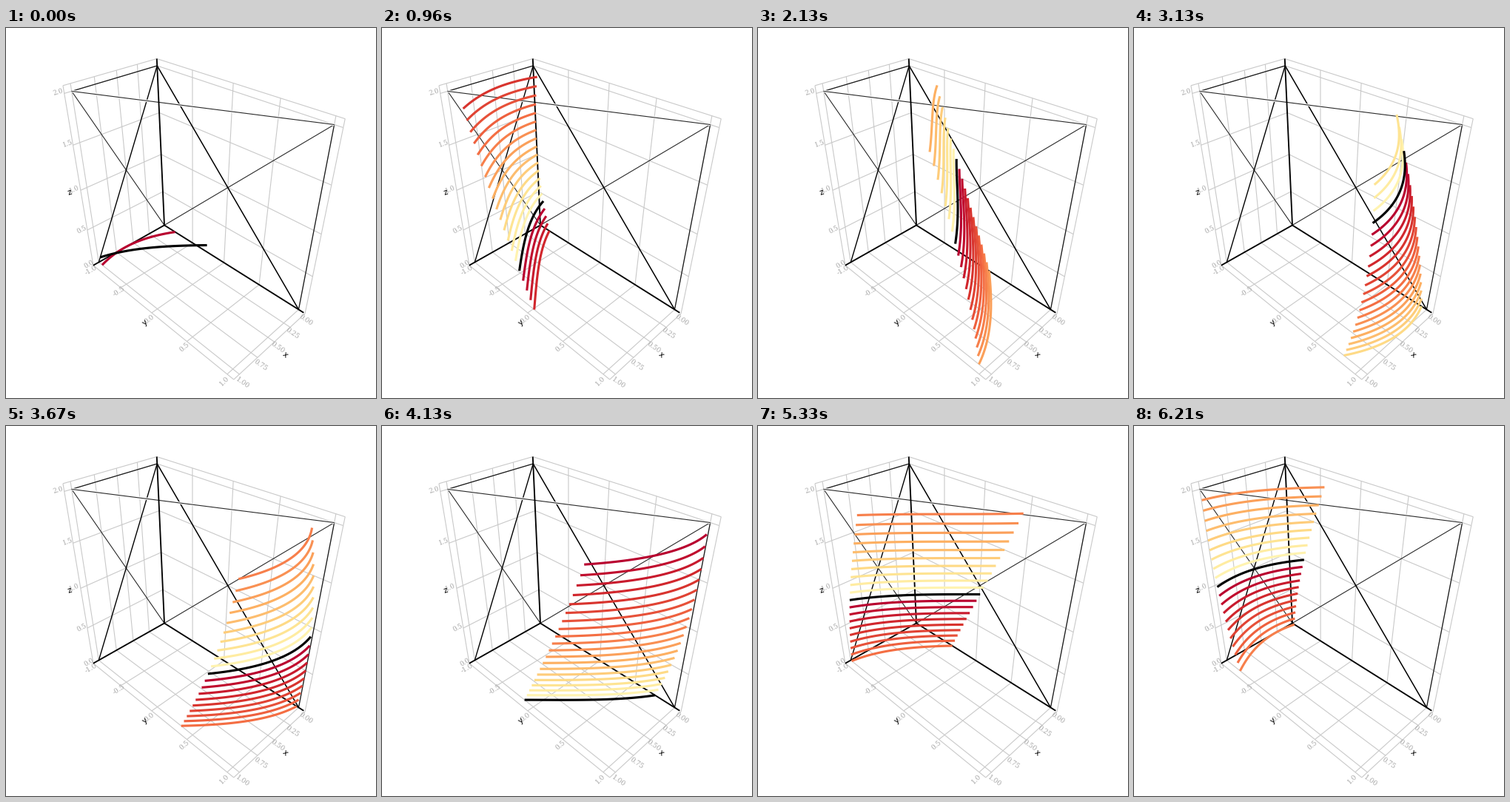
A matplotlib script that plays this animation: 500 by 500 pixels, repeating every 6.25 s.

```python
import numpy as np
import matplotlib.pyplot as plt
from matplotlib.animation import FuncAnimation
from matplotlib.colors import LinearSegmentedColormap

SIZE, STEPS, LOOP_MS = 500, 150, 6250
FRAMES = 2 * STEPS  # half steps, so each pose sits on its nearest tick
LEVELS, DZ = 20, 0.1
X_MAX, Y_MAX, Z_MAX = 1.075, 1.075, 2.07

# Box corners and where the camera puts them on the stage
CORNERS = np.array([[0, -1, 0], [1, -1, 0], [0, 1, 0], [0, -1, 2],
                    [1, -1, 2], [0, 1, 2], [X_MAX, Y_MAX, 0]])
PIXELS = np.array([[213.3, 266], [125, 316], [395, 380], [204, 50.5],
                   [88, 85], [443, 130], [307.3, 474.5]])


def solve_camera(points, pixels):
    """Perspective camera as a 3x4 matrix, by least squares."""
    rows, rhs = [], []
    for p, (px, py) in zip(points, pixels):
        h, none = [*p, 1], [0] * 4
        rows += [h + none + list(-px * p), none + h + list(-py * p)]
        rhs += [px, py]
    m = np.linalg.lstsq(np.array(rows, float), np.array(rhs), rcond=None)[0]
    return np.append(m, 1).reshape(3, 4)


CAMERA = solve_camera(CORNERS, PIXELS)


def project(x, y, z):
    x, y, z = np.broadcast_arrays(x, y, z)
    a, b, w = CAMERA @ np.array([x, y, z, np.ones_like(x, float)])
    return a / w, b / w


fig = plt.figure(figsize=(5, 5), dpi=100, facecolor="white")
ax = fig.add_axes([0, 0, 1, 1])
ax.set(xlim=(-0.5, SIZE - 0.5), ylim=(SIZE - 0.5, -0.5))
ax.axis("off")


def segment(p, q, color="black", lw=1.0, zorder=2):
    ax.plot(*project(*np.array([p, q], float).T), color=color, lw=lw,
            zorder=zorder, solid_capstyle="butt")


def grid(p, q):
    segment(p, q, "#c9c9c9", 0.8, 1)


for x in (0.25, 0.5, 0.75, 1, X_MAX):
    grid((x, -1, 0), (x, Y_MAX, 0))
    grid((x, -1, 0), (x, -1, Z_MAX))
for y in (-0.5, 0, 0.5, 1, Y_MAX):
    grid((0, y, 0), (X_MAX, y, 0))
    grid((0, y, 0), (0, y, Z_MAX))
for z in (0.5, 1, 1.5, 2, Z_MAX):
    grid((0, -1, z), (X_MAX, -1, z))
    grid((0, -1, z), (0, Y_MAX, z))

# Wall diagonals and edges
segment((1, -1, 2), (0, -1, 0), "#2a2a2a", 0.8)
segment((0, 1, 2), (0, -1, 0), "#2a2a2a", 0.8)
segment((0, 1, 2), (0, 1, 0), "#1a1a1a", 0.9)
segment((1, -1, 2), (0, -1, 2), "#1a1a1a", 0.9)
segment((0, -1, 2), (1, -1, 0), lw=1.0)
segment((0, -1, 2), (0, 1, 0), lw=1.1)
segment((1, -1, 2), (0, 1, 2), "white", 2.4, 3)
segment((1, -1, 2), (0, 1, 2), "#2a2a2a", 0.8, 3)

# Main axes
for end in ((X_MAX, -1, 0), (0, 1.06, 0), (0, -1, Z_MAX)):
    segment((0, -1, 0), end, lw=1.35, zorder=4)


def label(px, py, text, angle, **style):
    style = {"color": "#a6a6a6", "size": 6.5, "family": "DejaVu Serif", **style}
    ax.text(px, py, text, rotation=angle, ha="center", va="center", **style)


for px, py, text in ((405, 394, "0.00"), (387, 412, "0.25"), (367, 431, "0.50"),
                     (344, 455, "0.75"), (319, 479, "1.00")):
    label(px, py, text, -35)
for px, py, text, angle in ((114, 327, "-1.0", 30), (152, 356, "-0.5", 33),
                            (193, 393, "0.0", 37), (241, 431, "0.5", 41),
                            (295, 477, "1.0", 45)):
    label(px, py, text, angle)
for px, py, text, angle in ((112, 319, "0.0", 30), (102, 272, "0.5", 27),
                            (92, 217, "1.0", 23), (83, 156, "1.5", 20),
                            (70, 86, "2.0", 16)):
    label(px, py, text, angle, size=6.2)
for px, py, text, angle in ((376, 441, "x", -40), (187, 398, "y", 40),
                            (86, 222, "z", 20)):
    label(px, py, text, angle, color="black", size=7.5, family="DejaVu Sans")

AGES = LinearSegmentedColormap.from_list("ages", [
    (0, "#b8002f"), (0.2, "#d62f2c"), (0.44, "#f46d43"),
    (0.66, "#fdae61"), (0.86, "#fee08b"), (1, "#fff3b0")])

xs = np.linspace(0, 1, 40)
waves = [ax.plot([], [], lw=2.25, solid_capstyle="butt")[0]
         for _ in range(LEVELS)]


def update(k):
    n = min((k + 1) // 2, STEPS - 1)
    count = min(n + 2, LEVELS)
    head = (n + 1) % LEVELS
    # The twist between lowest and highest wave swings, then settles
    twist = 47.5 - 9.5 * np.exp(-n / 45) * np.cos(2 * np.pi * n / 40)
    middle = 130.75 - 6.3 * np.exp(-n / 10) + 2.48 * n
    for j, line in enumerate(waves):
        line.set_visible(j < count)
        if j >= count:
            continue
        phase = np.radians(middle + twist * (0.5 - j / (count - 1)))
        line.set_data(*project(xs, np.cos(phase + xs), j * DZ))
        age = (head - j) % LEVELS
        line.set_color(AGES((age - 1) / (LEVELS - 2)) if age else "black")
        line.set_zorder(6 if age else 7)
    return waves


anim = FuncAnimation(fig, update, frames=FRAMES, interval=LOOP_MS / FRAMES,
                     repeat=True, repeat_delay=0, blit=False)
plt.show()
```
